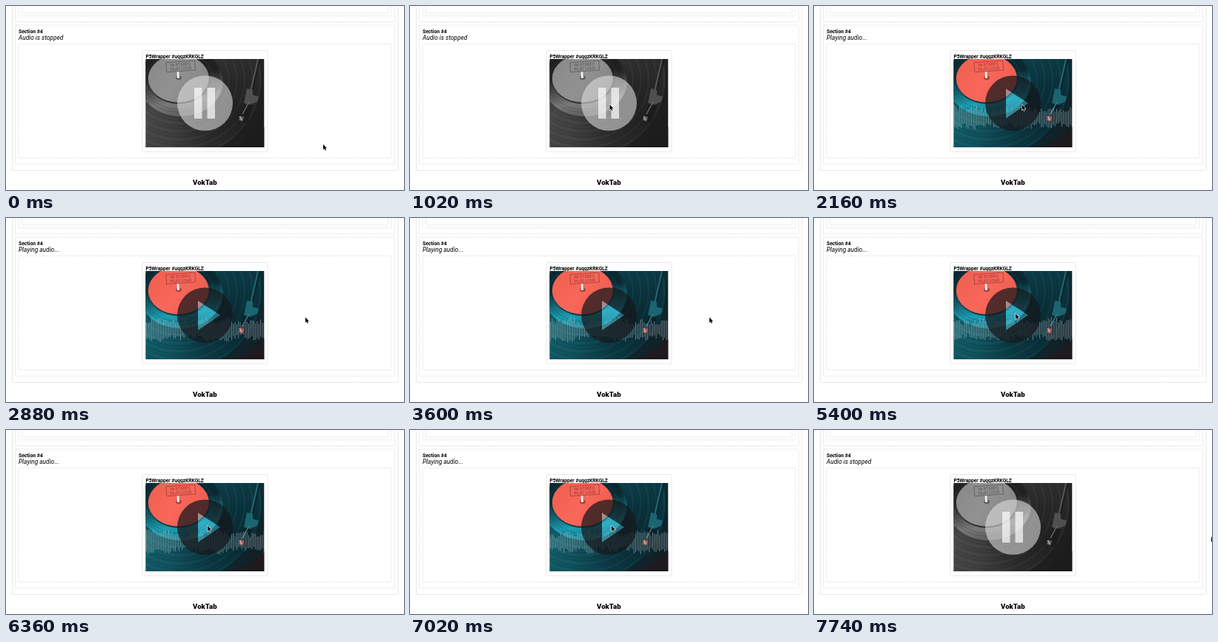
Write an HTML page with a canvas that moves like this. It is 537x250 px and loops after 9420 ms.

```html
<!DOCTYPE html>
<html lang="en">
<head>
<meta charset="utf-8">
<title>Audio section</title>
<style>
html, body { margin: 0; width: 100%; height: 100%; overflow: hidden; background: #fff; }
canvas { display: block; width: 537px; height: 250px; }
</style>
</head>
<body>
<canvas id="stage"></canvas>
<script>
const W = 537, H = 250, LOOP = 9420, STEP = 60;
const PLAY_AT = 1800, STOP_AT = 7320;
const PIC = { x: 188.5, y: 72, w: 160, h: 120 };
const canvas = document.getElementById('stage');
const ctx = canvas.getContext('2d');
const ratio = window.devicePixelRatio || 1;
canvas.width = W * ratio;
canvas.height = H * ratio;

// time, x, y of the pointer tip
const POINTER = [
  [0, 428, 188], [600, 272.5, 134], [900, 272.5, 134], [1020, 269.5, 134],
  [2070, 269.5, 134], [2580, 404, 135], [4135, 404, 135], [5105, 272, 130],
  [7500, 272, 130], [7680, 394, 142], [7740, 536, 145]
];

const smooth = s => s * s * (3 - 2 * s);
const mix = (a, b, s) => a + (b - a) * s;
const noise = n => {
  const v = Math.sin(n * 127.1 + 11.7) * 43758.5453;
  return v - Math.floor(v);
};

function pointerAt(t) {
  const i = POINTER.findIndex(k => k[0] > t);
  if (i < 0) return POINTER[POINTER.length - 1].slice(1);
  const a = POINTER[i - 1], b = POINTER[i];
  const s = smooth((t - a[0]) / (b[0] - a[0]));
  return [mix(a[1], b[1], s), mix(a[2], b[2], s)];
}

function label(str, x, y, font, color = '#000') {
  ctx.font = font + ' Roboto, sans-serif';
  ctx.fillStyle = color;
  ctx.fillText(str, x, y);
}

function frame(x0, y0, x1, y1, dash = [1.3, 1]) {
  ctx.strokeStyle = dash.length ? '#d2d2d2' : '#dedede';
  ctx.lineWidth = 0.7;
  ctx.setLineDash(dash);
  ctx.beginPath();
  ctx.roundRect(x0, y0, x1 - x0, y1 - y0, 1.2);
  ctx.stroke();
  ctx.setLineDash([]);
}

function poly(points, fill) {
  ctx.fillStyle = fill;
  ctx.beginPath();
  points.forEach(p => ctx.lineTo(p[0], p[1]));
  ctx.closePath();
  ctx.fill();
}

function oval(x, y, rx, ry, fill) {
  ctx.fillStyle = fill;
  ctx.beginPath();
  ctx.ellipse(x, y, rx, ry, 0, 0, Math.PI * 2);
  ctx.fill();
}

function line(points, width, color) {
  ctx.strokeStyle = color;
  ctx.lineWidth = width;
  ctx.beginPath();
  points.forEach(p => ctx.lineTo(p[0], p[1]));
  ctx.stroke();
}

function withStops(g, colors) {
  colors.forEach((c, i) => g.addColorStop(i / (colors.length - 1), c));
  return g;
}
const gradient = (x0, y0, x1, y1, ...colors) =>
  withStops(ctx.createLinearGradient(x0, y0, x1, y1), colors);
const sheen = (x, y, ...colors) => withStops(ctx.createConicGradient(0, x, y), colors);

function record() {
  const { x, y, w, h } = PIC;
  ctx.fillStyle = gradient(x, y, x + w, y + h, '#0c3c47', '#0c333d', '#141a20');
  ctx.fillRect(x, y, w, h);
  oval(233, 99, 112, 108, sheen(233, 99,
    '#0b353f', '#0a2a33', '#0b3942', '#11525d', '#125f6b', '#0b3a45',
    '#0a2f38', '#0a2c35', '#0a2a33', '#0c323b', '#0f434e', '#0b353f'));

  // bright band under the label
  oval(236, 102, 57, 48, gradient(225, 95, 233, 150, '#0a2a33', '#12606d', '#1c9db2', '#15788a'));
  ctx.lineWidth = 0.6;
  for (let i = 0; i < 20; i++) {
    ctx.strokeStyle = i % 3 ? 'rgba(2,20,26,.32)' : 'rgba(75,165,175,.2)';
    ctx.beginPath();
    ctx.ellipse(234, 100, 46 + i * 3.5, 37 + i * 3.7, 0, 0, Math.PI * 2);
    ctx.stroke();
  }
  oval(233.3, 99.5, 42, 33.5, '#0c3c47');
  oval(232.8, 98.5, 41, 32.5, gradient(195, 75, 270, 128, '#f0604f', '#f8675a', '#e9574a'));

  ctx.save();
  ctx.translate(235.7, 82);
  ctx.rotate(-0.07);
  ctx.strokeStyle = 'rgba(95,38,40,.6)';
  ctx.lineWidth = 0.8;
  ctx.strokeRect(-19.5, -6.5, 39, 13);
  ctx.textAlign = 'center';
  label('IN STEREO', 0, -0.6, '500 5.6px', 'rgba(95,38,40,.55)');
  label('PLAY LOUD', 0, 5, '500 5.6px', 'rgba(95,38,40,.55)');
  ctx.restore();

  oval(233, 97.5, 4, 3, 'rgba(90,30,32,.5)');
  ctx.fillStyle = gradient(231, 90, 235, 90, '#fff', '#e8e2df', '#77615e');
  ctx.fillRect(230.8, 89.5, 4, 8.5);

  poly([[349, 164], [349, 192], [305, 192], [332, 180]], 'rgba(38,24,28,.6)');
  line([[341, 72], [331, 116]], 5, '#08262e');
  line([[340, 72], [330, 116]], 2.2, '#226773');
  poly([[325, 112], [333, 114], [333, 121], [341, 123], [339, 130], [330, 134], [321, 132]], '#1b6470');
  poly([[322, 133], [333, 136], [325, 160], [313, 156]], '#10202a');
  line([[328, 130], [319, 147]], 1.6, '#2b7c88');
  poly([[316, 149], [321, 151], [319, 157], [314, 155]], '#a9483f');
  line([[315, 150], [318, 155]], 0.9, '#eedbd3');
}

function wave(tick) {
  ctx.strokeStyle = 'rgba(215,232,234,.55)';
  ctx.lineWidth = 0.8;
  ctx.beginPath();
  for (let i = 0; i < 70; i++) {
    const x = PIC.x + 1 + i * 2.3;
    const swell = 0.5 + 0.5 * Math.sin(i * 0.31 + tick * 1.7) * Math.sin(i * 0.13 - tick * 0.9);
    const up = 4 + 7 * swell + 7 * noise(i + tick * 83);
    const down = 5 + 6 * swell + 7 * noise(i * 3 + tick * 47);
    ctx.moveTo(x, 151.5 - up);
    ctx.lineTo(x, 151.5 + down);
  }
  ctx.stroke();
}

function playIcon() {
  const tri = new Path2D('M259 112.5L289 132L259 152.5Z');
  const disc = new Path2D();
  disc.arc(268.5, 132, 37.5, 0, Math.PI * 2);
  disc.addPath(tri);
  ctx.fillStyle = 'rgba(20,24,28,.72)';
  ctx.fill(disc, 'evenodd');
  ctx.fillStyle = 'rgba(75,195,220,.45)';
  ctx.fill(tri);
}

function pauseIcon() {
  oval(268.5, 132, 37.5, 37.5, 'rgba(225,225,225,.58)');
  ctx.fillStyle = 'rgba(250,250,250,.72)';
  ctx.fillRect(254, 111, 10.5, 42);
  ctx.fillRect(271.5, 111, 10.5, 42);
}

function picture(t, playing) {
  const { x, y, w, h } = PIC;
  ctx.save();
  ctx.beginPath();
  ctx.rect(x, y, w, h);
  ctx.clip();
  record();
  if (playing) {
    wave(Math.floor(t / STEP));
    playIcon();
  } else {
    ctx.globalCompositeOperation = 'saturation';
    ctx.fillStyle = '#808080';
    ctx.fillRect(x, y, w, h);
    ctx.globalCompositeOperation = 'source-over';
    pauseIcon();
  }
  ctx.restore();
}

function pointer([x, y]) {
  ctx.save();
  ctx.translate(x, y);
  const arrow = new Path2D('M0 0V7.2L1.6 5.7L2.7 8.2L3.9 7.7L2.8 5.2H5Z');
  ctx.lineJoin = 'round';
  ctx.strokeStyle = '#fff';
  ctx.lineWidth = 1.1;
  ctx.stroke(arrow);
  ctx.fillStyle = '#000';
  ctx.fill(arrow);
  ctx.restore();
}

function page(playing) {
  ctx.fillStyle = '#fff';
  ctx.fillRect(0, 0, W, H);
  frame(8.5, -10, 529, 223.5, []);
  frame(12.5, -10, 524.5, 21.5);
  frame(17, -10, 520, 13.5);
  frame(12.5, 26, 524.5, 215);
  frame(17, 51.5, 520, 206.5);
  frame(21.5, -10, 515.5, 9.5);
  frame(184, 60.5, 353, 198, []);
  label('Section #4', 17, 36.9, 'bold 6.75px');
  label(playing ? 'Playing audio...' : 'Audio is stopped', 17, 45.8, 'italic 8.33px');
  label('P5Wrapper #uqgzKRKGLZ', 188.5, 70.9, 'bold 6.67px');
  ctx.textAlign = 'center';
  label('VokTab', 268.3, 242.6, '900 9.6px');
  ctx.textAlign = 'left';
}

function draw(now) {
  const t = Math.floor((now % LOOP) / STEP) * STEP;
  const playing = t >= PLAY_AT && t < STOP_AT;
  ctx.setTransform(ratio, 0, 0, ratio, 0, 0);
  page(playing);
  picture(t, playing);
  pointer(pointerAt(t));
}

const start = performance.now();
function tick() {
  draw(performance.now() - start);
  requestAnimationFrame(tick);
}
tick();
</script>
</body>
</html>
```
